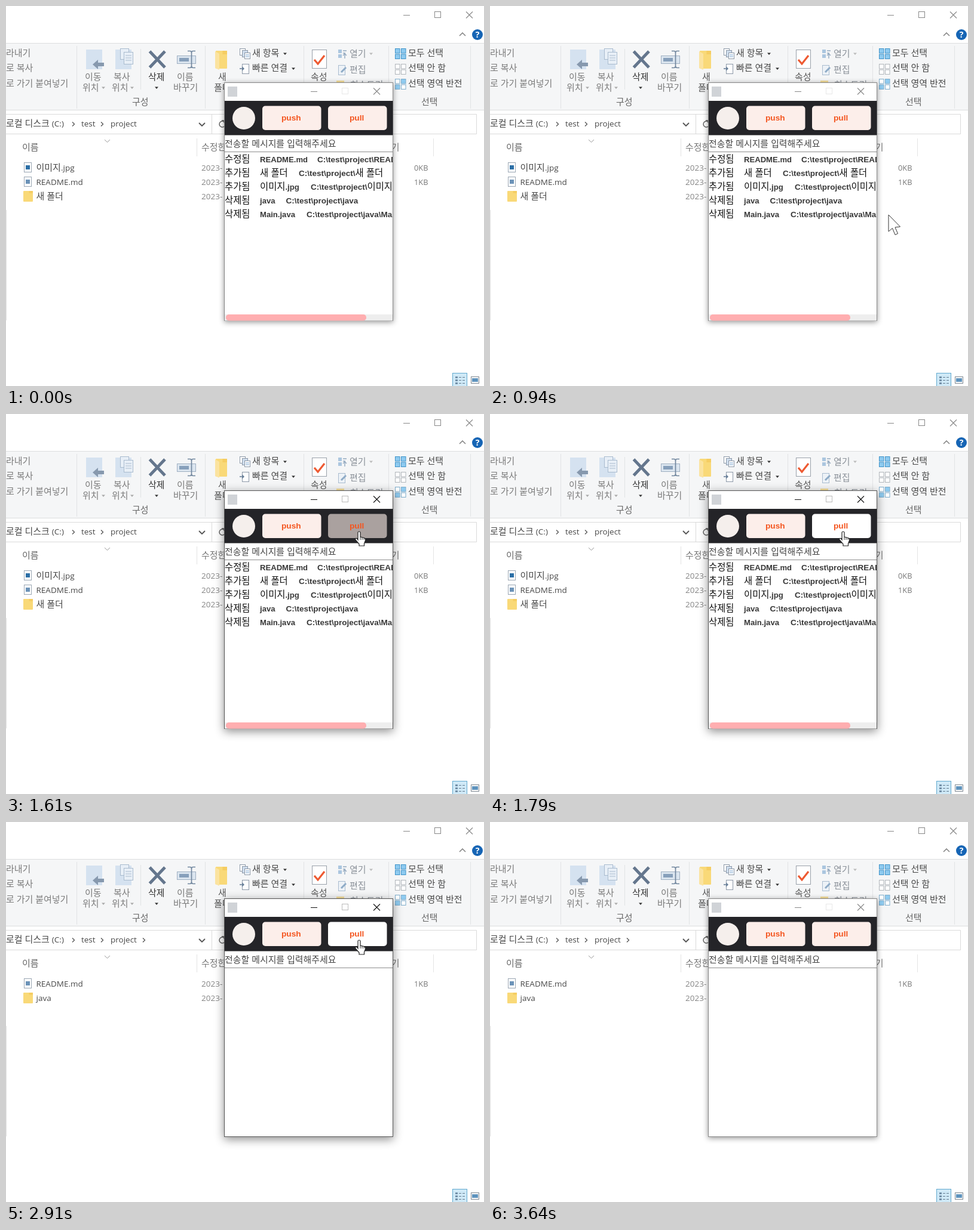
Recreate the animation shown at these times as an HTML page. Size 800 by 637 pixels, loop 3670 ms.

```html
<!DOCTYPE html>
<html lang="ko">
<head>
<meta charset="utf-8">
<style>
html, body { margin: 0; width: 100%; height: 100%; overflow: hidden; background: #fff; }
svg { display: block; }
text { font-family: "Open Sans", "Noto Sans CJK KR", sans-serif; white-space: pre; }
.swing { font-family: "Liberation Sans", "Noto Sans CJK KR", sans-serif; }
</style>
</head>
<body>
<svg id="stage" width="800" height="637" viewBox="0 0 800 637"></svg>
<script>
const LOOP = 3670;
const stage = document.getElementById('stage');

const rect = (x, y, w, h, fill, stroke = 'none', extra = '') =>
  `<rect x="${x}" y="${y}" width="${w}" height="${h}" fill="${fill}" stroke="${stroke}" ${extra}/>`;
const line = (d, stroke, width = 1, extra = '') =>
  `<path d="${d}" fill="none" stroke="${stroke}" stroke-width="${width}" ${extra}/>`;
const shape = (d, fill, extra = '') => `<path d="${d}" fill="${fill}" ${extra}/>`;
const group = (id, body, extra = '') => `<g id="${id}" ${extra}>${body}</g>`;

// Latin runs are set slightly smaller than Hangul.
const label = (x, y, str, fill = '#484848', size = 15) =>
  `<text x="${x}" y="${y}" font-size="${size}" fill="${fill}">` +
  str.replace(/[!-~]+/g, run => `<tspan font-size="${size * 0.9}">${run}</tspan>`) + '</text>';
const swing = (x, y, str, size = 13.3, fill = '#383838', weight = 700) =>
  `<text class="swing" x="${x}" y="${y}" font-size="${size}" fill="${fill}" font-weight="${weight}">${str}</text>`;
// Bold Latin mixed with lighter, larger Hangul.
const listText = (x, y, str, size) => swing(x, y,
  str.replace(/[가-힣 ]+/g, run => `<tspan font-size="15.4" font-weight="500" fill="#111">${run}</tspan>`), size);
const chevron = (x, y) => line(`M${x} ${y - 3.5}l3.5 3.5l-3.5 3.5`, '#555', 1.3);
const caret = (x, y, fill = '#333') => shape(`M${x - 3} ${y - 1.5}h6l-3 3.5z`, fill);

function windowButtons(x, y, dark, light) {
  return line(`M${x} ${y + .5}h11`, dark) +
    rect(x + 52.5, y - 5.5, 10, 10, 'none', light) +
    line(`M${x + 105} ${y - 5.5}l11 11m0-11l-11 11`, dark, 1.1);
}

function folder(x, y, w, h) {
  return rect(x, y, w, h, '#f9d978', 'none', 'rx="1"') +
    shape(`M${x + w * .6} ${y}h${w * .4}v${h * .2}h${-w * .4}z`, '#f5cd62');
}

function page(x, y, w, h, fill = '#fff', stroke = '#8d99a8') {
  return rect(x + .5, y + .5, w - 1, h - 1, fill, stroke);
}

function grid(x, y, fills, stroke) {
  return fills.map((fill, i) =>
    rect(x + (i % 2) * 10 + .5, y + (i >> 1) * 9.5 + .5, 7.5, 7.5, fill, stroke)).join('');
}

function ribbon() {
  const faded = '#8b9199', dim = '#7b7b7b';
  const separators = [[118, 67, 172], [225, 72, 140], [333, 67, 172], [498, 67, 172], [640, 67, 172], [777, 67, 172]];
  return rect(0, 63, 800, 111, '#f5f6f7') +
    line('M0 62.5H800M0 174.5H800', '#dcdddf') +
    separators.map(([x, a, b]) => line(`M${x + .5} ${a}V${b}`, '#e1e3e5')).join('') +
    label(0, 84, '라내기', dim) + label(0, 109, '로 복사', dim) + label(0, 134.5, '로 가기 붙여넣기', dim) +
    // move to, copy to
    rect(134, 73, 27, 33, '#d5e2f0') +
    shape('M145 98l9-8v5h10v6h-10v5z', '#8799ae') +
    rect(183, 73, 27, 33, '#d5e2f0') +
    page(191, 71, 15, 19, '#e8eff7', '#a9bbce') + page(197, 77, 16, 21, '#e8eff7', '#a9bbce') +
    line('M200 83h10m-10 4h10m-10 4h10', '#a9bbce') +
    label(132, 124, '이동', dim) + label(128, 141.5, '위치', dim) + caret(163, 137, '#aaa') +
    label(180, 124, '복사', dim) + label(177, 141.5, '위치', dim) + caret(211, 137, '#aaa') +
    // delete, rename
    line('M240.5 76l25.5 27m0-27l-25.500 27', '#64768d', 5) +
    rect(286.5, 83.5, 31, 13, '#dbe5ef', '#9fb0c2') + rect(290, 87, 16, 6, '#87a0bb') +
    line('M304 75.5h4q2.5 0 2.5 3v22q0 3-2.5 3h-4m13-28h-4q-2.5 0-2.5 3m0 22q0 3 2.5 3h4', '#71869e', 1.7) +
    label(238, 124, '삭제', '#333') + caret(252, 137) +
    label(286, 124, '이름', dim) + label(280, 141.5, '바꾸기', dim) +
    label(211, 166, '구성', '#666') +
    // new
    folder(351, 75, 19, 30) + shape('M350 76l7 4v27l-7-3z', '#fbe3a0') +
    label(355, 124, '새', '#555') + label(348, 141.5, '폴더', '#555') +
    page(391, 71, 10, 12) + page(395, 74, 10, 12, '#cfdded') + page(399, 78, 10, 11) +
    line('M401 82h6m-6 3h6', '#6f9cc9') +
    label(412, 84, '새 항목') + caret(467, 80) +
    page(395, 97, 12, 17) + line('M391 105h7m-3-3l3 3l-3 3', '#637b95', 1.4) +
    label(412, 109, '빠른 연결') + caret(481, 105) +
    // open
    page(512, 73, 25, 32, '#fff', '#99a1aa') + line('M516 90l6 7l11-14', '#ee5a32', 3.2) +
    label(510, 124, '속성', '#555') +
    rect(556, 73, 6, 6, '#abc6df') + rect(556, 81, 6, 6, '#abc6df') +
    line('M564 75h6m-6 4h4m-1 9v-8m-3 3l3-3l3 3', '#93a9bf', 1.4) +
    label(575, 85, '열기', faded) + caret(611, 80, '#bbb') +
    page(556, 99, 12, 17, '#edf2f7', '#a9bccf') + line('M561 111l8-8', '#8eabc7', 3) +
    label(575, 111.5, '편집', faded) +
    rect(553, 125, 13, 12, '#f6df9c') + label(576, 137, '히스토리', faded) +
    // select
    grid(651, 71, Array(4).fill('#8fcbf0'), '#3f93c9') +
    grid(651, 97, Array(4).fill('#fff'), '#b0b5ba') +
    grid(651, 122, ['#fff', '#8fcbf0', '#8fcbf0', '#fff'], '#7daccb') +
    label(673, 84, '모두 선택') + label(673, 109, '선택 안 함') + label(673, 134.5, '선택 영역 반전') +
    label(695, 166, '선택', '#666');
}

function fileIcon(x, y, color) {
  return page(x, y, 13, 17, '#fff', '#9aa6b3') + rect(x + 3, y + 5, 7, 7, color);
}

function fileRow(y, kind, name, size) {
  const icon = kind === 'folder' ? folder(29, y - 9, 16, 18) :
    fileIcon(30, y - 9, kind === 'image' ? '#2c6fa6' : '#6c93b8');
  return icon + label(50.5, y + 5, name) +
    label(327, y + 5, '2023-', '#858585') + (size ? label(683, y + 5, size, '#777', 14.2) : '');
}

function explorer() {
  return windowButtons(665, 15, '#888', '#888') +
    line('M759 50l5-5l5 5', '#777', 1.3) +
    '<circle cx="789" cy="48" r="9" fill="#1665b5"/>' +
    '<text x="789" y="53" font-size="14" font-weight="700" fill="#fff" text-anchor="middle">?</text>' +
    ribbon() +
    line('M0 181.5H787.5V214.5H0M344.5 181V214', '#dadada') +
    label(0, 202, '로컬 디스크 (C:)') + chevron(111, 198) +
    label(126, 202, 'test') + chevron(159, 198) + label(175, 202, 'project') +
    line('M323 196l5 5l5-5', '#555', 1.8) +
    line('M365 194a5 5 0 1 0 2 5M361 192h4v4', '#666', 1.5) +
    line('M165 224l4.5 4.5l4.5-4.5', '#999') +
    line('M319.5 222V252M715.5 222V252', '#e4e4e4') +
    label(27, 242, '이름', '#666') + label(327, 242, '수정한 날짜', '#777') + label(631, 242, '크기', '#777') +
    line('M.5 342V527', '#e2e2e2') +
    group('before',
      fileRow(271, 'image', '이미지.jpg', '0KB') +
      fileRow(295, 'text', 'README.md', '1KB') +
      fileRow(319, 'folder', '새 폴더')) +
    group('after', chevron(229, 198) +
      fileRow(271, 'text', 'README.md', '1KB') +
      fileRow(295, 'folder', 'java')) +
    rect(747.5, 615.5, 24, 24, '#cfe9f7', '#62a9cf') +
    [621, 626, 631].map(y => rect(752, y, 4, 3, '#7390a8') +
      line(`M758 ${y + 1.5}h4m2 0h4`, '#667d91')).join('') +
    page(778, 621, 14, 12, '#fff', '#7d8790') + rect(780, 624, 10, 6, '#5e93bd');
}

function changeRow(i, status, name, pathX, path = name) {
  const y = 262 + i * 23;
  return listText(366, y, status) + listText(425, y, name, 13.1) +
    listText(pathX, y, 'C:\\test\\project\\' + path, 13.5);
}

function gitWindow() {
  return rect(365.5, 128.5, 282, 399, '#fff', '#777', 'id="frame"') +
    rect(371, 135, 16, 17, '#d0d3d7') +
    group('inactive', windowButtons(510, 143, '#888', '#e8e8e8')) +
    group('active', windowButtons(510, 143, '#111', '#bbb')) +
    rect(366, 159, 281.5, 57, '#242428') +
    '<circle cx="398" cy="188" r="19" fill="#f5efec"/>' +
    rect(429, 167.5, 98.5, 40.5, '#fceeea', 'none', 'rx="5"') +
    rect(539, 167.5, 98.5, 40.5, '#fceeea', 'none', 'rx="5" id="pull"') +
    swing(461, 192, 'push', 13.7, '#f4551f') + swing(575, 192, 'pull', 13.7, '#f4551f') +
    line('M366 216.5H647M366 244.5H647', '#8c8c8c') +
    swing(366, 235.5, '전송할 메시지를 입력해주세요', 14.9, '#444', 400) +
    group('changes',
      changeRow(0, '수정됨', 'README.md', 521) +
      changeRow(1, '추가됨', '새 폴더', 490) +
      changeRow(2, '추가됨', '이미지.jpg', 510) +
      changeRow(3, '삭제됨', 'java', 468.5) +
      changeRow(4, '삭제됨', 'Main.java', 503, 'java\\Main.java') +
      rect(366, 517, 281, 10.5, '#eee') +
      rect(368, 517, 235, 10.5, '#ffaeb0', 'none', 'rx="5"'), 'clip-path="url(#body)"');
}

stage.innerHTML =
  `<clipPath id="body">${rect(366, 245, 281, 283, '#000')}</clipPath>` +
  explorer() + gitWindow() +
  group('cursor',
    shape('M0 0V28L6.5 22.5L11 33.5L15.5 31.5L11 21L19.5 20Z', '#fff', 'id="arrow" stroke="#333"') +
    group('hand',
      shape('M-1 14V2a2 2 0 0 1 4 0V9L9 10.5Q12 11.5 11.5 15L9.5 20V24H1V21L-5 14Q-6 11-3 11.5Z', '#fff', 'stroke="#222" stroke-width="1.2"') +
      line('M3 9v5M6 10v4M9 11v3', '#333')));

const el = {};
stage.querySelectorAll('[id]').forEach(node => { el[node.id] = node; });
const show = (id, on) => { el[id].style.display = on ? '' : 'none'; };

// time, x, y of the pointer's hot spot
const pointerPath = [
  [30, 780, 637], [550, 745, 458], [640, 745, 458], [1090, 628, 297], [1180, 590, 197],
  [2390, 590, 197], [2400, 589, 197], [2910, 589, 197], [3300, 790, 640]
];

function pointerAt(t) {
  const i = pointerPath.findIndex(p => p[0] > t);
  if (i < 1) return null;
  const [t0, x0, y0] = pointerPath[i - 1], [t1, x1, y1] = pointerPath[i];
  const k = (t - t0) / (t1 - t0);
  return [x0 + (x1 - x0) * k, y0 + (y1 - y0) * k];
}

function render(t) {
  const pointer = pointerAt(t);
  const hover = !!pointer && pointer[0] > 538 && pointer[0] < 638 && pointer[1] > 167 && pointer[1] < 209;
  const pressed = t >= 1420 && t < 1730;
  const active = t >= 1420 && t < 3520;
  const refreshed = t >= 2390;

  show('cursor', pointer);
  if (pointer) el.cursor.setAttribute('transform', `translate(${pointer.map(Math.round)})`);
  show('hand', hover);
  show('arrow', !hover);
  el.pull.setAttribute('fill', pressed ? '#aaa19f' : hover ? '#fff' : '#fceeea');
  show('active', active);
  show('inactive', !active);
  el.frame.setAttribute('stroke', active ? '#555' : '#888');
  el.frame.style.filter = active
    ? 'drop-shadow(0 4px 8px rgba(0,0,0,.45))'
    : 'drop-shadow(0 2px 5px rgba(0,0,0,.42))';
  show('changes', t < 2060);
  show('before', !refreshed);
  show('after', refreshed);
}

const start = performance.now();
function tick() {
  render((performance.now() - start) % LOOP);
  requestAnimationFrame(tick);
}
tick();
</script>
</body>
</html>
```
